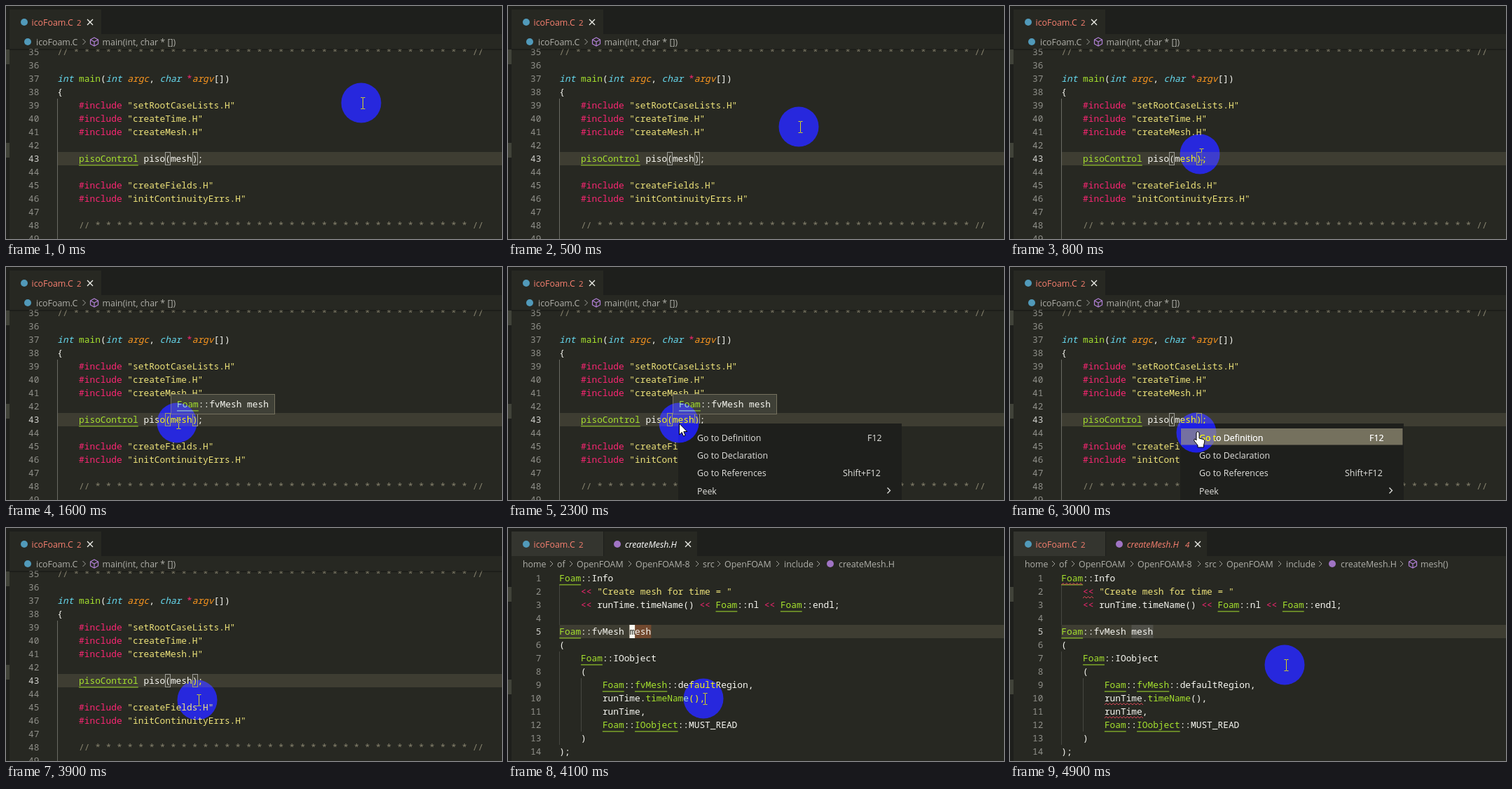
An HTML page that plays this animation: 708x332 px, repeating every 5 s.

```html
<!DOCTYPE html>
<html lang="en">
<head>
<meta charset="utf-8">
<title>Go to definition</title>
<style>
html, body { margin: 0; width: 100%; height: 100%; overflow: hidden; background: #272822; }
svg { display: block; width: 708px; height: 332px; isolation: isolate; }
text { white-space: pre; }
.code { font: 500 12.83px "Noto Sans Mono", "DejaVu Sans Mono", monospace; fill: #f8f8f2; }
.ui { font: 12.4px "Open Sans", "Noto Sans", sans-serif; fill: #b0b0aa; }
.num { fill: #90908a; font-weight: 400; }
.now { fill: #d0d0cc; }
.k { fill: #f92672; }
.s { fill: #eee37a; }
.f, .c { fill: #a6e22e; }
.t { fill: #66d9ef; font-style: italic; }
.p { fill: #fd971f; font-style: italic; }
.m { fill: #88846f; }
.bad { fill: #f88070; }
.lit { fill: #fff; }
.item { fill: #e2e2de; }
.small { font-size: 11.5px; }
.it { font-style: italic; }
.end { text-anchor: end; }
.line { fill: none; stroke: #a0a09a; }
.bright { stroke: #e2e2de; stroke-width: 1.3; }
.squiggle { fill: none; stroke: #e8495c; }
.cross { fill: none; stroke: #f0f0ea; stroke-width: 1.3; }
.cube { fill: none; stroke: #b180d7; stroke-width: 1.2; stroke-linejoin: round; }
.shape { fill: #fff; stroke: #000; stroke-width: 1; }
.spot { fill: #00f; mix-blend-mode: difference; }
.beam { fill: none; stroke: #fff; mix-blend-mode: difference; }

.spot, .move { animation: move 5s step-end infinite; }
.beam { animation: move 5s step-end infinite, beam 5s step-end infinite; }
.tip, .menu, .pick, .arrow, .hand, .view2, .flash, .block, .symbol, .errors, .clean {
  animation: 5s step-end infinite; }
.tip { animation-name: tip; }
.menu { animation-name: menu; }
.pick { animation-name: pick; }
.arrow { animation-name: arrow; }
.hand { animation-name: pick; }
.view2 { animation-name: view2; }
.flash { animation-name: flash; }
.block { animation-name: block; }
.symbol { animation-name: symbol; }
.errors { animation-name: errors; }
.clean { animation-name: clean; }

@keyframes tip { 0%, 58%, 100% { opacity: 0 } 28% { opacity: 1 } }
@keyframes menu { 0%, 78%, 100% { opacity: 0 } 46% { opacity: 1 } }
@keyframes beam { 0%, 78%, 100% { opacity: 1 } 46% { opacity: 0 } }
@keyframes arrow { 0%, 60%, 100% { opacity: 0 } 46% { opacity: 1 } }
@keyframes pick { 0%, 78%, 100% { opacity: 0 } 60% { opacity: 1 } }
@keyframes view2 { 0% { opacity: 0 } 80%, 100% { opacity: 1 } }
@keyframes flash { 0%, 88%, 100% { opacity: 0 } 80% { opacity: 1 } }
@keyframes block { 0%, 90%, 100% { opacity: 0 } 80% { opacity: 1 } }
@keyframes symbol { 0% { opacity: 0 } 86%, 100% { opacity: 1 } }
@keyframes errors { 0% { opacity: 0 } 92%, 100% { opacity: 1 } }
@keyframes clean { 0% { opacity: 1 } 92%, 100% { opacity: 0 } }
@keyframes move {
  0% { transform: translate(507px, 138px) }
  6% { transform: translate(514px, 130px) }
  8% { transform: translate(487px, 145px) }
  10% { transform: translate(415px, 172px) }
  12% { transform: translate(325px, 202px) }
  14% { transform: translate(278px, 211px) }
  16% { transform: translate(271px, 211px) }
  18% { transform: translate(267px, 214px) }
  20% { transform: translate(257px, 222px) }
  22% { transform: translate(246px, 231px) }
  24% { transform: translate(240px, 235px) }
  26% { transform: translate(241px, 232px) }
  28% { transform: translate(243px, 228px) }
  30% { transform: translate(244px, 225px) }
  32% { transform: translate(244px, 222px) }
  58% { transform: translate(253px, 228px) }
  60% { transform: translate(266px, 236px) }
  62% { transform: translate(270px, 241px) }
  64% { transform: translate(272px, 244px) }
  66% { transform: translate(273px, 245px) }
  80% { transform: translate(276px, 245px) }
  82% { transform: translate(279px, 243px) }
  90% { transform: translate(289px, 240px) }
  92% { transform: translate(319px, 228px) }
  94% { transform: translate(359px, 210px) }
  96% { transform: translate(386px, 198px) }
  98%, 100% { transform: translate(392px, 195px) }
}
</style>
</head>
<body>
<svg id="stage" viewBox="0 0 708 332"></svg>
<script>
const NS = 'http://www.w3.org/2000/svg';
const stage = document.getElementById('stage');
const CH = 7.697, LEFT = 73.3, ROW = 19;

function el(parent, tag, attrs, text) {
  const node = document.createElementNS(NS, tag);
  for (const key in attrs) node.setAttribute(key, attrs[key]);
  if (text) node.textContent = text;
  return parent.appendChild(node);
}
const group = (parent, cls) => el(parent, 'g', { class: cls });
const rect = (g, x, y, width, height, fill, cls = '') =>
  el(g, 'rect', { x, y, width, height, fill, class: cls });
const path = (g, d, cls) => el(g, 'path', { d, class: cls });
const label = (g, x, y, text, cls = '') => el(g, 'text', { x, y, class: 'ui ' + cls }, text);
const dot = (g, cx, cy, fill) => el(g, 'circle', { cx, cy, r: 5, fill });
const chevron = (g, x, y, cls = '') => path(g, `M${x - 2} ${y - 4}l4 4l-4 4`, 'line ' + cls);
const cross = (g, x) => path(g, `M${x - 4} 19l8 8m0-8l-8 8`, 'cross');
const cube = (g, x, y) =>
  path(g, `M${x} ${y - 6}l5.5 3v6l-5.5 3l-5.5-3v-6zM${x - 5.5} ${y - 3}l5.5 3l5.5-3M${x} ${y}v6`, 'cube');

// Tokens are written {class|text}; class c is underlined.
function code(g, x, base, source) {
  let col = 0;
  for (const [, cls = '', marked, plain] of source.matchAll(/\{(\w)\|(.*?)\}|((?:(?!\{\w\|).)+)/g)) {
    const text = marked ?? plain;
    const indent = text.length - text.trimStart().length;
    const at = x + col * CH;
    if (text.trim())
      el(g, 'text', { x: at + indent * CH, y: base, class: 'code ' + cls }, text.trimStart());
    if (cls === 'c') rect(g, at, base + 4.4, text.length * CH, 1, '#a6e22e');
    col += text.length;
  }
}

function lines(g, top, first, active, rows) {
  rows.forEach((source, i) => {
    const n = first + i, base = top + i * ROW + 14;
    el(g, 'text', { x: 47.5, y: base, class: 'code end num' + (n === active ? ' now' : '') }, String(n));
    code(g, LEFT, base, source);
  });
}

function squiggle(g, col, row, chars) {
  const x = LEFT + col * CH, y = 62 + row * ROW;
  const waves = Math.round(chars * CH / 5);
  path(g, `M${x} ${y}` + 'l2.5-2.5l2.5 2.5'.repeat(waves), 'squiggle');
}

function frame(g, marks) {
  rect(g, 0, 0, 708, 332, '#272822');
  rect(g, 0, 0, 708, 40, '#1e1f1c');
  rect(g, 0, 0, 5, 332, '#1e1f1c');
  for (const y of marks) rect(g, 0, y, 5, 21, '#414339');
}

function firstTab(g, fill) {
  rect(g, 5, 5, 131, 35, fill);
  dot(g, 26, 23, '#519aba');
  label(g, 36.5, 27.5, 'icoFoam.C', 'bad');
  label(g, 101, 27.5, '2', 'bad small');
}

function solverView() {
  const g = group(stage, 'view1');
  frame(g, [62, 195]);
  rect(g, LEFT, 208, 635, ROW, '#3e3d32');
  rect(g, 73, 132, 1, 200, '#6a6b64');
  for (const col of [20, 25])
    el(g, 'rect', { x: Math.round(LEFT + col * CH) + .5, y: 208.5, width: 7, height: 18, class: 'line' });

  const rule = n => '{m|// ' + '* '.repeat(n) + '//}';
  const include = name => `    {k|#include} {s|"${name}.H"}`;
  lines(g, 56, 35, 43, [
    rule(37),
    '',
    '{t|int} {f|main}({t|int} {p|argc}, {t|char} {k|*}{p|argv}[])',
    '{',
    include('setRootCaseLists'),
    include('createTime'),
    include('createMesh'),
    '',
    '    {c|pisoControl} piso(mesh);',
    '',
    include('createFields'),
    include('initContinuityErrs'),
    '',
    '    ' + rule(35),
    ''
  ]);

  rect(g, 5, 40, 703, 21, '#272822');
  rect(g, 5, 61, 703, 2, '#000').setAttribute('opacity', .25);
  firstTab(g, '#272822');
  cross(g, 120);
  dot(g, 31, 51, '#519aba');
  label(g, 43, 55.5, 'icoFoam.C');
  chevron(g, 111.5, 51);
  cube(g, 126, 51);
  label(g, 137.5, 55.5, 'main(int, char * [])');
}

function tooltip() {
  const g = group(stage, 'tip');
  el(g, 'rect', { x: 235.5, y: 181.5, width: 148, height: 28, fill: '#3f4037', stroke: '#75715e' });
  code(g, 244, 200, '{c|Foam}::fvMesh mesh');
}

function menu() {
  const g = group(stage, 'menu');
  rect(g, 243, 223, 319, 109, '#1e1f1c');
  rect(g, 244, 230, 316.5, 23.5, '#75715e', 'pick');
  const items = [['Go to Definition', 'F12', 513], ['Go to Declaration'], ['Go to References', 'Shift+F12', 478], ['Peek']];
  items.forEach(([name, key, x], i) => {
    const y = 248 + i * 25.2;
    label(g, 270, y, name, 'item');
    if (key) label(g, x, y, key, 'item');
  });
  chevron(g, 543.5, 318.5, 'bright');
  const on = group(g, 'pick');
  label(on, 270, 248, 'Go to Definition', 'lit');
  label(on, 513, 248, 'F12', 'lit');
}

function meshView() {
  const g = group(stage, 'view2');
  frame(g, [84, 216]);
  firstTab(g, '#34352f');
  rect(g, 137, 5, 133, 35, '#272822');

  const clean = group(g, 'clean');
  label(clean, 167, 27.5, 'createMesh.H', 'it lit');
  cross(clean, 257);

  const crumbs = { home: 21, of: 70, OpenFOAM: 98, 'OpenFOAM-8': 182, src: 278, 'OpenFOAM ': 309, include: 394 };
  for (const name in crumbs) label(g, crumbs[name], 55.5, name.trim());
  for (const x of [62, 90, 174, 270, 301, 385, 443]) chevron(g, x, 51);
  dot(g, 460, 51, '#a074c4');
  label(g, 472, 55.5, 'createMesh.H');
  const symbol = group(g, 'symbol');
  chevron(symbol, 559, 51);
  cube(symbol, 575, 51);
  label(symbol, 586, 55.5, 'mesh()');

  rect(g, LEFT, 138, 635, ROW, '#3e3d32');
  rect(g, 173.4, 138, 31, ROW, '#4f4f48', 'symbol');
  rect(g, 173.4, 138, 31, ROW, '#72492f', 'flash');
  rect(g, 73, 81, 1, 57, '#464741');
  rect(g, 73, 176, 1, 133, '#464741');
  rect(g, 104, 214, 1, 76, '#464741');

  lines(g, 62, 1, 5, [
    '{c|Foam}::Info',
    '    {k|<<} {s|"Create mesh for time = "}',
    '    {k|<<} runTime.timeName() {k|<<} {c|Foam}::nl {k|<<} {c|Foam}::endl;',
    '',
    '{c|Foam}::fvMesh mesh',
    '(',
    '    {c|Foam}::IOobject',
    '    (',
    '        {c|Foam}::{c|fvMesh}::defaultRegion,',
    '        runTime.{f|timeName}(),',
    '        runTime,',
    '        {c|Foam}::{c|IOobject}::MUST_READ',
    '    )',
    ');'
  ]);

  const block = group(g, 'block');
  rect(block, 173.4, 138, CH, ROW, '#f8f8f0');
  el(block, 'text', { x: 173.4, y: 152, class: 'code', style: 'fill:#272822' }, 'm');

  const errors = group(g, 'errors');
  rect(errors, 137, 5, 144, 35, '#272822');
  label(errors, 167, 27.5, 'createMesh.H', 'it bad');
  label(errors, 250, 27.5, '4', 'it bad small');
  cross(errors, 268);
  squiggle(errors, 0, 1, 4);
  squiggle(errors, 4, 2, 2);
  squiggle(errors, 8, 10, 7);
  squiggle(errors, 8, 11, 7);
  dot(g, 156, 23, '#a074c4');
}

function pointer() {
  el(stage, 'circle', { r: 28.5, class: 'spot' });
  path(stage, 'M-.5-7.5h2.5l.5 .5l.5-.5h2.5M2.5-7v15M-.5 8.5h2.5l.5-.5l.5 .5h2.5', 'beam');
  const g = group(stage, 'move');
  path(group(g, 'arrow'), 'M.5 1v16l3.7-3.5l2.3 5.5l2.6-1l-2.3-5.5h5z', 'shape');
  path(group(g, 'hand'),
    'M0 1C0-2 4-2 4 1V8L10 9.5Q12 10 11.8 13L10.5 18V21H2V18L-3 12Q-4 9-2 9L0 11Z', 'shape');
}

solverView();
tooltip();
menu();
meshView();
pointer();
</script>
</body>
</html>
```
